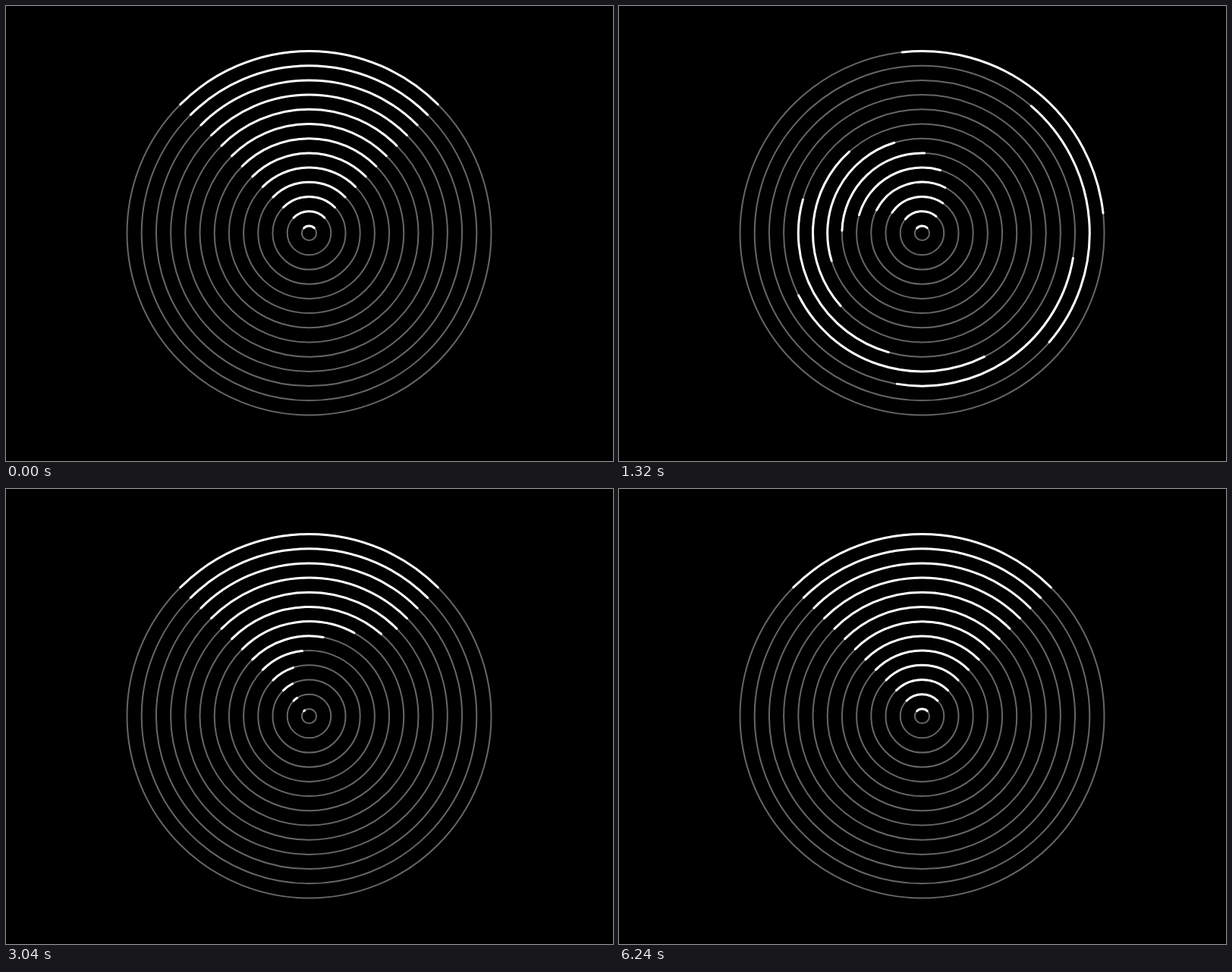
Write an HTML page that moves like this. It is 800 px wide and 600 px high and loops after 6720 ms.

```html
<!DOCTYPE html>
<html lang="en">
<head>
<meta charset="utf-8">
<title>Concentric arcs</title>
<style>
  html, body { margin: 0; width: 100%; height: 100%; overflow: hidden; background: #000; }
  svg { display: block; width: 100%; height: 100%; }
  circle, path { fill: none; }
  circle { stroke: #666; stroke-width: 2; }
  path { stroke: #fff; stroke-width: 3; stroke-linecap: round; }
</style>
</head>
<body>
<svg id="stage" viewBox="0 0 800 600"></svg>
<script>
const LOOP = 6720, STEP = 40;
const RINGS = 13, GAP = 19.2, STAGGER = 80;
const CX = 399.5, CY = 299.5;
const SPIN = { at: 160, length: 1280 };
const SHRINK = { at: 2400, length: 960 };
const GROW = { at: 4320, length: 960 };

const stage = document.getElementById('stage');

function add(tag, attrs) {
  const el = document.createElementNS('http://www.w3.org/2000/svg', tag);
  for (const key in attrs) el.setAttribute(key, attrs[key]);
  return stage.appendChild(el);
}

// Cubic Bezier easing that is flat at both ends: (x1, 0, x2, 1).
function bezier(x1, x2) {
  return x => {
    if (x <= 0) return 0;
    if (x >= 1) return 1;
    let lo = 0, hi = 1;
    for (let k = 0; k < 30; k++) {
      const s = (lo + hi) / 2, q = 1 - s;
      if (3 * q * q * s * x1 + 3 * q * s * s * x2 + s * s * s < x) lo = s;
      else hi = s;
    }
    return lo * lo * (3 - 2 * lo);
  };
}

const spinEase = bezier(0.333, 0.19);
const trimEase = bezier(0.258, 0.208);
const progress = (t, phase) => (t - phase.at) / phase.length;

const radii = Array.from({ length: RINGS }, (_, i) => GAP * (i + 0.5));
radii.forEach(r => add('circle', { cx: CX, cy: CY, r }));
const arcs = radii.map(r => ({ r, el: add('path', {}) }));

// Angles in degrees, clockwise from the top.
function point(r, deg) {
  const a = deg * Math.PI / 180;
  return (CX + r * Math.sin(a)).toFixed(3) + ' ' + (CY - r * Math.cos(a)).toFixed(3);
}

function draw(time) {
  arcs.forEach(({ r, el }, i) => {
    const t = time - i * STAGGER;
    const start = -45 + 360 * spinEase(progress(t, SPIN));
    const sweep = 90 * (1 - trimEase(progress(t, SHRINK)) + trimEase(progress(t, GROW)));
    el.setAttribute('d', sweep < 0.01 ? '' :
      `M${point(r, start)}A${r} ${r} 0 0 1 ${point(r, start + sweep)}`);
  });
}

const origin = performance.now();
function tick() {
  const t = (performance.now() - origin) % LOOP;
  draw(Math.floor(t / STEP) * STEP);
  requestAnimationFrame(tick);
}
draw(0);
requestAnimationFrame(tick);
</script>
</body>
</html>
```
